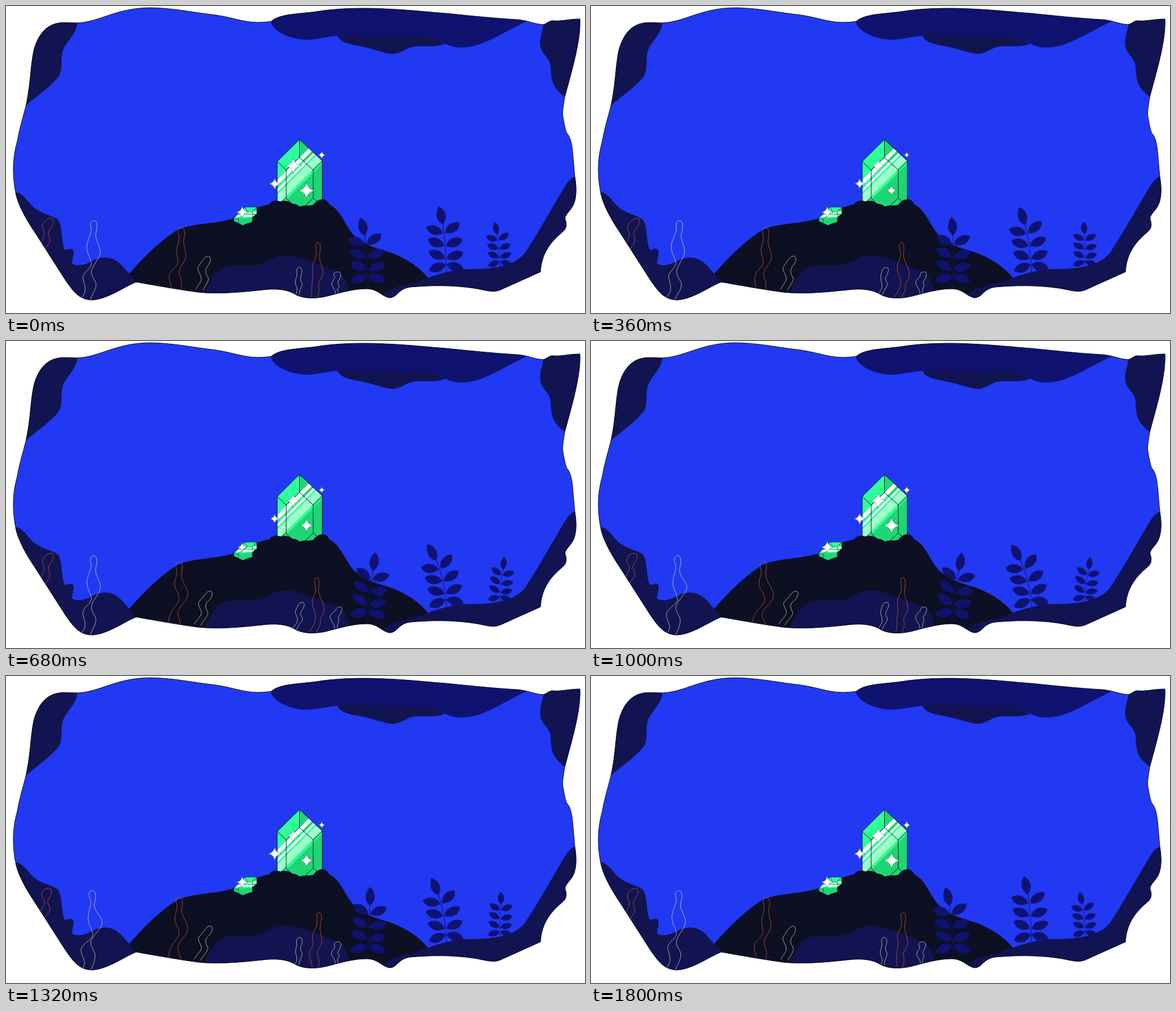
An HTML page without scripts for the animation above (1840 ms loop, 1027 by 545 pixels).

```html
<!DOCTYPE html>
<html lang="en">
<head>
<meta charset="utf-8">
<title>Sea cave crystal</title>
<style>
  html, body { margin: 0; width: 100%; height: 100%; overflow: hidden; background: #fff; }
  svg { display: block; }

  .deep { fill: #111450; }
  .plum { fill: #101270; }
  .rock { fill: #0c1022; }
  .edge { fill: none; stroke: #0a0d22; stroke-width: 1; }

  .joint, .glint, .weed { animation: 1.84s cubic-bezier(.37, 0, .63, 1) infinite; }

  /* each joint turns a little, so a plant bends along its height */
  .joint { animation-name: bend; }
  @keyframes bend {
    0%, 100% { transform: translateY(-22.5px) rotate(var(--a)); }
    48% { transform: translateY(-22.5px) rotate(var(--b)); }
  }
  .stem { stroke: #101270; stroke-width: 1.2; }

  .glint { animation-name: glint; fill: #fff; stroke: #14553f; stroke-width: .5; }
  @keyframes glint {
    0%, 54%, 98%, 100% { transform: scale(var(--a)); }
    20% { transform: scale(var(--b)); }
    37% { transform: scale(var(--c)); }
    72%, 80% { transform: scale(var(--d)); }
  }

  .weed { animation-name: wave; animation-delay: var(--t); fill: none; stroke-width: .8; }
  @keyframes wave { 50% { d: var(--q); } }
  .cream { stroke: #d3d3a4; }
  .coral { stroke: #d4552f; }
</style>
</head>
<body>
<svg width="1027" height="545" viewBox="0 0 1027 545">
  <defs>
    <path id="roof" d="M13 290C13 270 16 255 20 240C25 212 32 192 36 174C44 135 43 110 49 80C57 48 75 28 105 29.500L127 30C168 28 195 3 258 3C300 4 335 12 372 16C400 20 422 29 445 29C458 29 466 28 471 27C485 14 520 14 550 10C580 5 610 4 640 4C700 5 740 10 780 13C830 18 870 22 905 24C925 25 935 32 953 33C960 31 963 26 970 26C980 28 1000 23 1018 23C1020 60 1005 110 991 162C989 175 986 190 988 197C991 215 993 222 995 226C1006 238 1005 265 1009 303"/>
    <path id="base" d="M1009 303C1013 325 1012 347 1003 359C998 366 990 373 992 379C996 390 993 397 985 403C965 420 950 440 948 472L877 504C863 510 850 504 830 501C790 495 750 496 717 499C695 502 695 517 681 518C668 517 660 502 640 502C615 502 590 510 570 515C550 520 530 520 515 513C500 503 480 501 455 504C400 510 370 511 340 508C310 504 270 497 231 490C210 498 180 521 152 522C130 521 120 508 105 486L50 400C35 378 20 350 17 331C14 315 13 303 13 290"/>
    <clipPath id="cave">
      <use href="#roof"/>
      <use href="#base"/>
      <rect x="14" y="284" width="994" height="22"/>
    </clipPath>
    <clipPath id="gem"><path d="M520.500 237L561 275V356H481V276Z"/></clipPath>
    <clipPath id="chip"><path d="M404 377L424 357H445V368L437 375V383L427 386L420 389L412 385L405 382Z"/></clipPath>

    <path id="star" vector-effect="non-scaling-stroke" d="M0-1Q.13-.13 1 0Q.13.13 0 1Q-.13.13-1 0Q-.13-.13 0-1Z"/>
    <path id="leaf" d="M-2 4C-3-8-16-17-30-11C-27 3-16 8-2 4Z"/>
    <g id="pair"><use href="#leaf"/><use href="#leaf" transform="scale(-1 1)"/></g>
    <g id="droop">
      <use href="#leaf" transform="translate(-2 -12) rotate(-45)"/>
      <use href="#leaf" transform="scale(-1 1) translate(-2 -12) rotate(-45)"/>
      <path class="stem" d="M0 15V-22.500"/>
    </g>
    <g id="level">
      <use href="#leaf"/>
      <use href="#leaf" transform="scale(-1 1) rotate(-11)"/>
      <path class="stem" d="M0 0V-22.500"/>
    </g>
    <g id="crown">
      <use href="#pair"/>
      <path class="stem" d="M0 0V-14"/>
      <path d="M0-12C-12-20-11-34-3-45C7-38 12-24 0-12Z"/>
    </g>
  </defs>

  <g clip-path="url(#cave)">
    <rect width="1027" height="545" fill="#2139f3"/>

    <!-- ceiling -->
    <path class="deep" d="M127 30C124 52 105 64 100 82C97 98 101 115 93 126C80 142 55 160 35 177L0 177V0H127Z"/>
    <path class="deep" d="M953 33C951 50 944 60 949 76C953 88 965 92 966 108C967 135 970 145 992 162L1027 162V0H953Z"/>
    <path class="deep" d="M588 53C595 68 615 68 640 74C670 82 680 86 689 85C705 82 712 73 725 72C745 70 765 74 779 67L740 45H600Z"/>
    <path class="plum" d="M470 27C470 42 500 59 533 60C555 59 570 54 588 53C620 49 690 55 725 54C755 54 765 58 778 66C795 76 810 75 830 71C858 64 888 44 922 28V0H470Z"/>

    <!-- large crystal -->
    <g clip-path="url(#gem)">
      <path fill="#1ed774" d="M470 230H570V360H470Z"/>
      <path fill="#2dff9a" d="M520.500 237V269L497 291V341L481 352V276Z"/>
      <path fill="#2dff9a" d="M497 291L520.500 269L545 291L497 339Z"/>
      <g fill="none">
        <path stroke="#2dff9a" stroke-width="24" d="M461 363L581 243"/>
        <path stroke="#9fffc8" stroke-width="13" d="M461 364L581 244"/>
        <path stroke="#fff" stroke-width="7" d="M461 334L581 214"/>
        <path stroke="#fff" stroke-width="4" d="M461 348L581 228"/>
      </g>
    </g>
    <path class="edge" d="M481 350V276L520.500 237L561 275V350M520.500 237V269L497 291L481 276M520.500 269L545 291L561 275M497 291V341L484 351M545 291V341L557 351M497 341L509 354M545 341L531 354"/>

    <!-- sea floor -->
    <path class="deep" d="M15 331C28 328 40 350 50 358C65 370 85 372 93 380C101 395 98 425 105 433C112 432 118 428 120 436C120 445 117 452 117 457C125 463 140 460 152 453C170 443 190 444 205 460L240 500V545H0V331Z"/>
    <path class="rock" d="M218 476C245 445 275 415 305 397C335 385 370 387 400 378C430 362 450 356 467 352C470 345 480 344 487 347C495 344 504 347 508 351C514 351 519 354 521 356C529 353 537 355 545 353C549 347 555 343 562 343C569 344 572 348 573 352C590 360 597 378 608 395C620 415 640 425 670 434C705 443 735 465 748 482V545H240L231 490Z"/>
    <path class="deep" d="M350 515C367 472 380 463 400 461C430 459 440 464 460 455C478 445 490 441 508 444C540 451 565 463 586 471C601 479 607 490 609 506V545H350Z"/>

    <g class="plum">
      <g transform="translate(781 489.500)" style="--a:-1.900deg;--b:-6.200deg">
        <g class="joint"><use href="#droop"/>
          <g class="joint"><use href="#level"/>
            <g class="joint"><use href="#level"/>
              <g class="joint"><use href="#crown"/></g></g></g></g>
      </g>
      <g transform="translate(876 474.500) scale(.68)" style="--a:-2.100deg;--b:3.200deg">
        <g class="joint"><use href="#droop"/>
          <g class="joint"><use href="#level"/>
            <g class="joint"><use href="#level"/>
              <g class="joint"><use href="#crown"/></g></g></g></g>
      </g>
    </g>

    <path class="deep" d="M666 516C680 497 705 497 730 489C755 480 785 468 820 467C855 467 898 465 920 439C937 414 962 370 985 331C994 315 1002 303 1010 303H1027V545H666Z"/>

    <g class="plum" transform="translate(642 509.500)" style="--a:-1.850deg;--b:3.500deg">
      <g class="joint"><use href="#droop"/>
        <g class="joint"><use href="#level"/>
          <g class="joint"><use href="#level"/>
            <g class="joint"><use href="#crown"/></g></g></g></g>
    </g>

    <!-- small crystal -->
    <g clip-path="url(#chip)">
      <path fill="#2dff9a" d="M400 350H450V395H400Z"/>
      <path fill="#1ed774" d="M404 378H412L437 375V390H404ZM437 364L445 357V369L437 375Z"/>
      <path fill="#9fffc8" d="M417 364H445V369H412Z"/>
      <path fill="#fff" d="M410 371H441L437 374.500H406Z"/>
    </g>
    <path class="edge" d="M404 377L424 357H445V368M424 357L428 365H437L445 357M437 365V383M404 378H412L428 365M412 378V385" opacity=".6"/>

    <!-- seaweed -->
    <path class="weed coral" d="M73 440C70 434 61 424 64 417S70 408 66 398S72 378 81 377S84 392 78 398S80 412 77 420S68 428 72 438"
      style="--t:-1.480s;--q:path('M63 424C62 420 61 418 64 412S72 404 66 396S64 378 74 377S82 388 76 395S79 409 78 415S69 424 69 431')"/>
    <path class="weed cream" d="M131 519C146 508 141 495 138 483S154 465 150 453S139 432 144 418S153 400 151 391S156 381 158 381S165 387 161 400S166 424 166 436S150 463 152 474S162 488 160 498S150 514 149 523"
      style="--t:-1.520s;--q:path('M134 520C146 508 134 500 133 488S155 468 154 458S144 440 146 425S153 405 149 396S148 381 153 381S161 388 157 402S171 428 171 438S150 464 150 473S158 488 158 497S154 514 150 523')"/>
    <path class="weed coral" d="M294 503C294 495 287 487 290 477S306 462 305 452S301 438 304 427S308 412 306 404S307 393 311 393S319 400 316 412S320 434 319 444S305 466 307 475S315 488 309 504"
      style="--t:-1.780s;--q:path('M287 503C286 490 292 482 300 473S310 462 307 452S296 438 298 427S304 414 301 405S301 392 306 392S313 398 310 411S323 438 324 450S306 474 304 483S306 492 310 504')"/>
    <path class="weed cream" d="M337 503C341 493 348 491 346 482S337 468 342 461S352 444 358 444S364 453 358 461S354 475 358 481S354 496 349 505"
      style="--t:-1.740s;--q:path('M333 503C337 494 350 486 346 478S339 466 345 461S356 444 363 444S368 455 360 461S353 473 357 480S348 495 344 505')"/>
    <path class="weed cream" d="M515 512C519 503 515 500 513 493S518 480 516 474S516 464 520 464S526 471 523 479S526 490 525 495S520 506 521 513"
      style="--t:-.2s;--q:path('M507 511C514 503 518 500 517 493S511 484 514 478S519 464 525 464S530 471 525 478S524 488 526 492S519 502 515 513')"/>
    <path class="weed coral" d="M537 516C544 510 550 500 550 490S542 472 543 462S552 446 549 438S546 420 551 420S555 432 554 441S565 466 565 477S557 490 558 498S552 512 549 519"
      style="--t:-1.340s;--q:path('M543 517C543 508 536 499 538 491S548 480 544 470S552 446 552 438S550 420 555 420S561 430 558 441S561 464 560 472S551 486 552 493S560 508 552 519')"/>
    <path class="weed cream" d="M583 514C588 506 578 500 578 494S586 484 582 479S584 472 589 472S595 479 590 487S594 496 590 500S588 508 592 515"
      style="--t:-.2s;--q:path('M582 512C586 505 576 498 575 491S583 481 585 477S589 472 593 472S597 479 592 486S592 494 590 498S587 506 589 515')"/>

    <!-- glints -->
    <g transform="translate(533 327.500)"><use class="glint" href="#star" style="--a:15;--b:9.500;--c:12;--d:12"/></g>
    <g transform="translate(509.500 283.500)"><use class="glint" href="#star" style="--a:14.500;--b:11.500;--c:12;--d:11"/></g>
    <g transform="translate(476.500 315.500)"><use class="glint" href="#star" style="--a:10.500;--b:9.500;--c:8.500;--d:12"/></g>
    <g transform="translate(560 264.500)"><use class="glint" href="#star" style="--a:7;--b:5.500;--c:6;--d:6"/></g>
    <g transform="translate(419 366)"><use class="glint" href="#star" style="--a:11;--b:10.500;--c:8.500;--d:10.500"/></g>
  </g>

  <use class="edge" href="#roof"/>
  <use class="edge" href="#base"/>
</svg>
</body>
</html>
```
